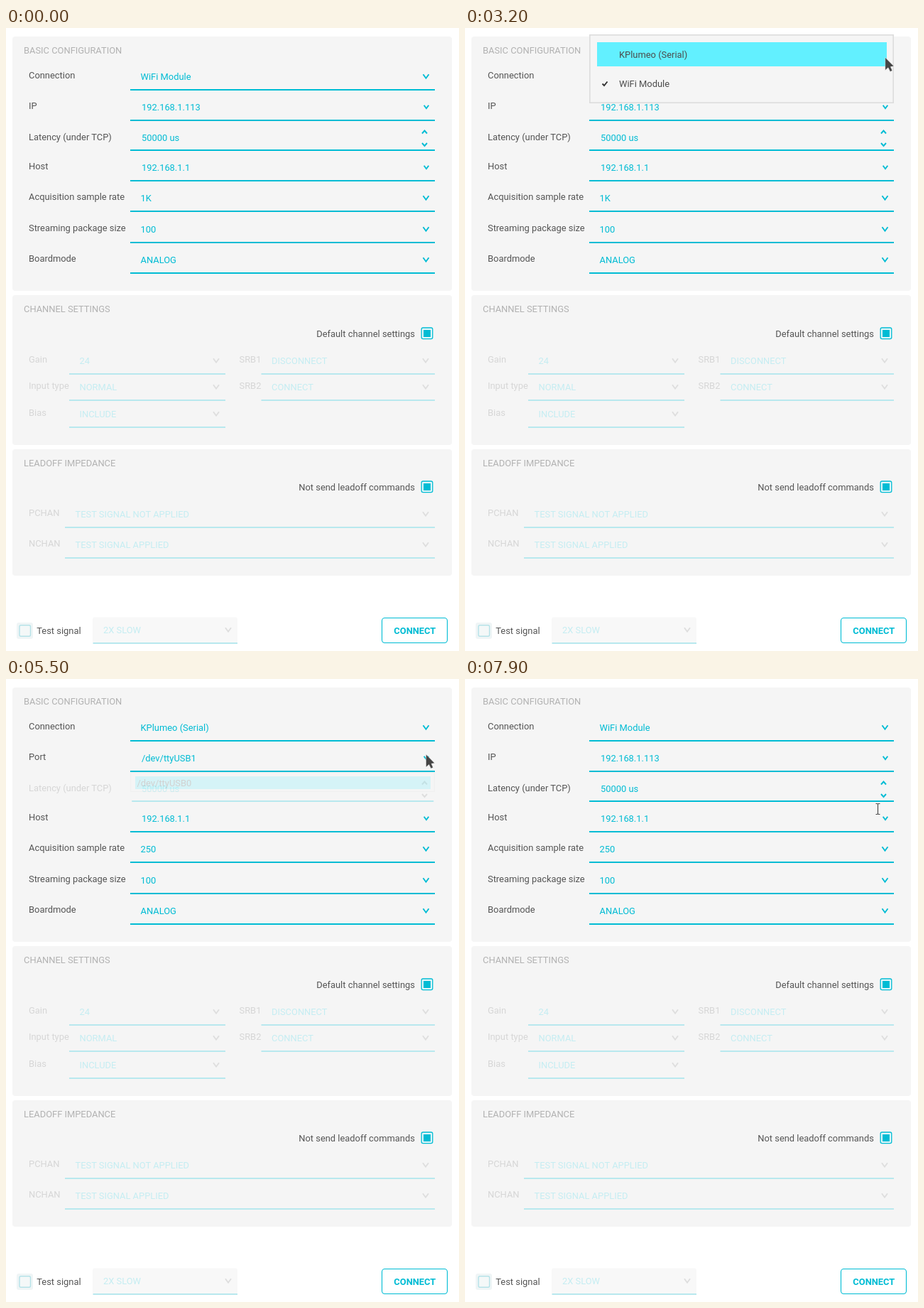
These frames come from a looping animation (638x877 px, 8 s). An HTML page:

```html
<!DOCTYPE html>
<html lang="en">
<head>
<meta charset="utf-8">
<title>Board configuration</title>
<style>
  html, body { margin: 0; width: 100%; height: 100%; overflow: hidden; background: #fff; }
  svg { display: block; width: 100%; height: 100%; }
  text { font: 12.9px Roboto, sans-serif; white-space: pre; }
</style>
</head>
<body>
<svg id="stage" viewBox="0 0 638 877"></svg>
<script>
const LOOP = 8000, TICK = 100, PITCH = 43.5, ITEM = 41;
const CYAN = '#00bcd4', PALE = '#c5edf2', PALE_LINE = '#b8e8ee', DIM = '#dedede';
const INK = '#555', MENU_INK = '#4c4c4c', GREY = '#d6d6d6', TITLE = '#b2b2b2';
const PANEL = '#f5f5f5', GLOW = '#62f0ff', EDGE = '#dcdcdc';
const SERIAL = 'KPlumeo (Serial)', WIFI = 'WiFi Module';
const stage = document.getElementById('stage');

function set(el, attrs) {
  for (const k in attrs) el.setAttribute(k, attrs[k]);
  return el;
}
function add(tag, attrs, parent = stage) {
  const el = document.createElementNS('http://www.w3.org/2000/svg', tag);
  return parent.appendChild(set(el, attrs));
}
const rect = (x, y, width, height, fill, more, parent) =>
  add('rect', { x, y, width, height, fill, ...more }, parent);
const stroke = (d, color, width, parent) =>
  add('path', { d, fill: 'none', stroke: color, 'stroke-width': width }, parent);
const border = (color, width, rx = 0) => ({ stroke: color, 'stroke-width': width, rx });
function text(str, x, y, fill, parent) {
  const el = add('text', { x, y, fill }, parent);
  el.textContent = str;
  return el;
}
const chevron = (x, y, color, w = 4, h = 5.5) =>
  stroke(`M${x - w} ${y - h / 2}L${x} ${y + h / 2}L${x + w} ${y - h / 2}`, color, 1.9);
const underline = (x0, x1, y, color) => rect(x0, y, x1 - x0, 2, color);

function panel(y, h, title) {
  rect(9, y, 619, h, PANEL, { rx: 4 });
  text(title, 25, y + 23.5, TITLE);
}
function checkBox(label, x, y) {
  text(label, x, y + 4.5, INK);
  rect(585.2, y - 8, 15.6, 15.6, '#e3f6f9', border(CYAN, 1.3, 2));
  rect(588, y - 5, 10, 10, CYAN);
}
function disabledCombo(label, x, value, x0, x1, y) {
  text(label, x, y - 15, GREY);
  text(value, x0 + 14.5, y - 13, PALE);
  underline(x0, x1, y, PALE_LINE);
  chevron(x1 - 13, y - 18, DIM);
}
function row(label, value, y, editable) {
  y = Math.floor(y);
  const l = text(label, 32, y - 15, INK);
  const v = text(value, editable ? 191 : 189.5, y - 13, CYAN);
  underline(175, 604, y, CYAN);
  chevron(editable ? 592 : 591.5, y - 18, CYAN, editable ? 3.3 : 4, editable ? 4.5 : 5.5);
  return { l, v };
}

panel(12, 358, 'BASIC CONFIGURATION');
const connection = row('Connection', WIFI, 86);
const port = row('IP', '192.168.1.113', 86 + PITCH, true);
const [, rate] = [
  ['Host', '192.168.1.1'], ['Acquisition sample rate', '1K'],
  ['Streaming package size', '100'], ['Boardmode', 'ANALOG']
].map(([label, value], i) => row(label, value, 214 + PITCH * i, i === 0));

const latency = {
  label: text('Latency (under TCP)', 32, 158, INK),
  value: text('50000 us', 191, 159, CYAN),
  line: underline(175, 604, 171, CYAN),
  arrows: [chevron(589.5, 146.5, CYAN, 3.5, -4), chevron(589.5, 164, CYAN, 3.5, 4)]
};
const caret = rect(267.5, 103, 1.2, 18, '#222');

panel(376, 211, 'CHANNEL SETTINGS');
checkBox('Default channel settings', 437.2, 430);
['Gain,24', 'Input type,NORMAL', 'Bias,INCLUDE', 'SRB1,DISCONNECT', 'SRB2,CONNECT'].forEach((s, i) => {
  const [label, value] = s.split(','), left = i < 3;
  const y = Math.floor(486 + 37.5 * (i % 3));
  disabledCombo(label, left ? 32 : 328.5, value, left ? 89 : 359.5, left ? 309 : 604, y);
});

panel(593, 178, 'LEADOFF IMPEDANCE');
checkBox('Not send leadoff commands', 412.3, 646);
disabledCombo('PCHAN', 32, 'TEST SIGNAL NOT APPLIED', 83, 604, 702);
disabledCombo('NCHAN', 32, 'TEST SIGNAL APPLIED', 83, 604, 745);

rect(15, 837, 23, 23, '#eff5f6', { rx: 3 });
rect(19, 840.8, 15.5, 15.5, '#f4f8f8', border('#b5e2e8', 1.4, 2));
text('Test signal', 43.3, 853, INK);
rect(122, 829.5, 204, 36.5, '#f8f8f8', { rx: 3 });
disabledCombo('', 0, '2X SLOW', 122.5, 326, 865);
rect(529.5, 830.5, 92, 35, '#fff', border(CYAN, 1.1, 4));
text('CONNECT', 546.3, 853, CYAN).style.fontWeight = 700;

// Popups
const menu = add('g');
rect(175.8, 9.8, 427.4, 95.4, PANEL, border(EDGE, 1.6), menu);
const menuGlow = rect(186, 20, 408, 34, GLOW, {}, menu);
[SERIAL, WIFI].forEach((s, i) => text(s, 217, 41.5 + ITEM * i, MENU_INK, menu));
const tick = stroke('M193.5 37.5L196 40L200.5 34.5', '#333', 1.9, menu);

const portMenu = add('g');
rect(175.6, 132, 427.8, 26.5, PANEL, border(EDGE, 1), portMenu);
rect(182, 137, 416, 18, GLOW, {}, portMenu);
text('/dev/ttyUSB0', 184.5, 151, MENU_INK, portMenu);

// Pointers
const arrow = add('path', {
  d: 'M0 0V18L4.2 14.4L7 20L10 18.6L7.6 13.2L12.2 12.4Z',
  fill: '#454545', stroke: '#fff', 'stroke-opacity': .6, 'stroke-width': .7
});
const beam = add('g');
const beamPath = 'M-3 -7.5H-1L0 -6.8L1 -7.5H3M0 -6.8V6.8M-3 7.5H-1L0 6.8L1 7.5H3';
stroke(beamPath, '#fff', 2.6, beam);
stroke(beamPath, '#444', 1.2, beam);

// Pointer moves: from time, to time, x, y
const moves = [
  [500, 1300, 584, 69], [1300, 1400, 591, 67], [1900, 2200, 628, -4], [2200, 2400, 624, 35],
  [2800, 2900, 619, 41], [3000, 3500, 551, 42], [3800, 4500, 575.5, 120], [4500, 4800, 580.5, 117],
  [4900, 5100, 590, 96], [5100, 5300, 591.5, 106], [6200, 6300, 589, 100], [6300, 6600, 556, 70],
  [6900, 7200, 494, 128], [7500, 7900, 581.5, 183]
];
const ramp = (t, a, b) => Math.min(1, Math.max(0, (t - a) / (b - a)));
const within = (t, a, b) => t >= a && t < b;
const fade = (t, open, close) =>
  Math.min(ramp(t, open, open + 200), 1 - ramp(t, close, close + 300)) ** 1.5;

function pointer(t) {
  let x = 476, y = -24;
  for (const [a, b, toX, toY] of moves) {
    const u = ramp(t, a, b);
    x += (toX - x) * u;
    y += (toY - y) * u;
  }
  return `translate(${x} ${y})`;
}

function draw(ms) {
  const t = Math.floor(ms % LOOP / TICK) * TICK;
  const serial = within(t, 3700, 7500);

  connection.v.textContent = serial ? SERIAL : WIFI;
  port.l.textContent = serial ? 'Port' : 'IP';
  port.v.textContent = serial ? '/dev/ttyUSB1' : '192.168.1.113';
  rate.v.textContent = t >= 3700 ? '250' : '1K';

  set(latency.label, { fill: serial ? GREY : INK });
  set(latency.value, { fill: serial ? PALE : CYAN });
  set(latency.line, serial
    ? { x: 177, width: 425.5, rx: 1, fill: PALE_LINE }
    : { x: 175, width: 429, rx: 0, fill: CYAN });
  latency.arrows.forEach(el => set(el, { stroke: serial ? DIM : CYAN }));
  set(caret, { opacity: +within(t, 6200, 6700) });

  const second = t > 5000;
  const lower = second ? t >= 7100 : t < 3200;
  set(menu, {
    opacity: fade(t, 1500, 3600) + fade(t, 6700, 7400),
    transform: `translate(0 ${second ? ITEM : 0})`
  });
  set(menuGlow, { y: lower ? 20 + ITEM : 20 });
  set(tick, { transform: `translate(0 ${second ? 0 : ITEM})` });
  set(portMenu, { opacity: fade(t, 5430, 6050) });

  const typing = within(t, 4400, 5000) || t >= 7800;
  const transform = pointer(t);
  set(arrow, { opacity: +!typing, transform });
  set(beam, { opacity: +typing, transform });
}

const start = performance.now();
function frame() {
  draw(performance.now() - start);
  requestAnimationFrame(frame);
}
frame();
</script>
</body>
</html>
```
